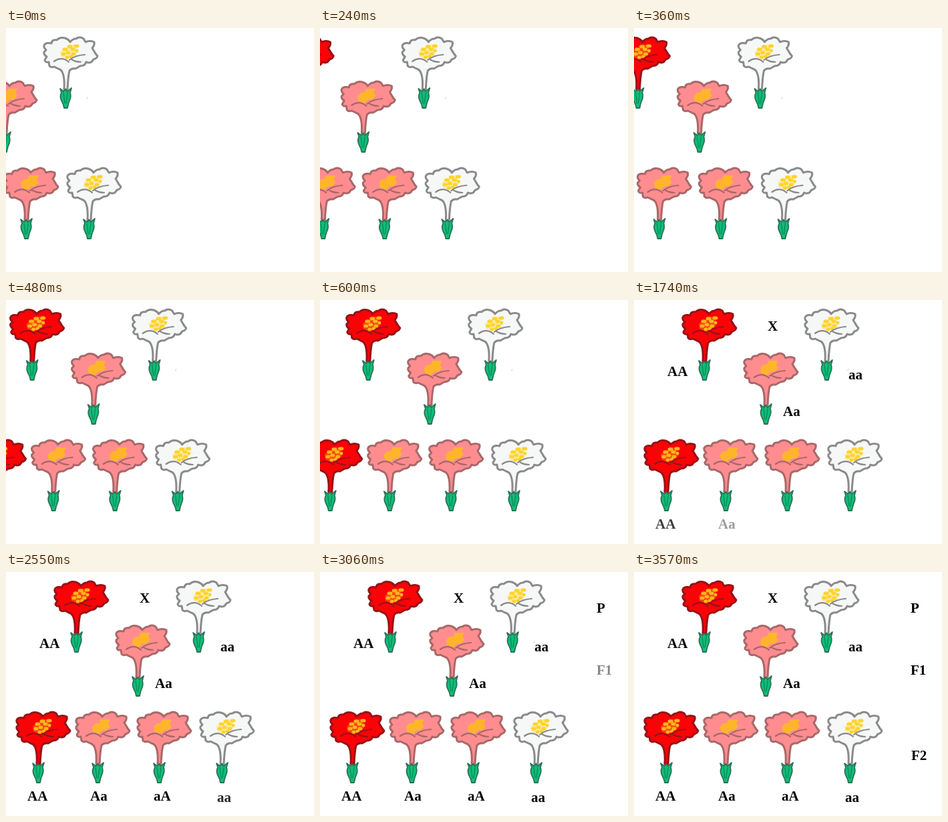
Write an HTML page with a canvas that moves like this. It is 461 px wide and 366 px high and loops after 4.6 s.

```html
<!DOCTYPE html>
<html lang="en">
<head>
<meta charset="utf-8">
<title>Flower crossing</title>
<style>
html, body { margin: 0; width: 100%; height: 100%; overflow: hidden; background: #fff; }
canvas { display: block; }
</style>
</head>
<body>
<canvas width="461" height="366"></canvas>
<script>
const ctx = document.querySelector('canvas').getContext('2d');
const LOOP = 4600, STEP = 30, SLIDE = 720, DISTANCE = 199, FADE = 510;

// Flower parts, in the coordinates of the upper white flower
const petals = new Path2D(`M295 21 Q299 16 304 16 Q309 12 315 16 L318 21 Q325 18 331 21
  Q332 26 328 30 L331 35 Q333 39 336 42 Q335 46 330 47 L327 51 Q323 53 319 51
  Q317 57 310 57 L303 61 Q297 60 294 64 Q292 72 291 92 L286 92 Q287 76 284 68
  Q282 62 277 61 L271 58 Q267 60 264 57 L263 51 Q257 52 257 48 L260 43 Q255 40 256 36
  L259 33 Q255 29 256 26 Q258 21 267 23 Q268 17 275 18 Q280 13 287 15 Q293 17 295 21 Z`);
const folds = new Path2D('M271 50 Q282 42 293 51 M294 48 Q302 41 317 40 M297 47 Q303 51 311 51');
const calyx = new Path2D(`M280 91 L285 95 L288 92 L291 95 L297 90 L295 97 Q297 103 294 109
  Q292 114 291 120 H286 Q285 114 282 109 Q279 103 282 97 Z`);
const veins = new Path2D('M285 97 L287 113 M291 97 L289 113');
const heart = new Path2D('M280 36 L285 31 L290 31 L293 25 L307 25 L304 31 L307 36 L302 41 L295 42 L290 47 L281 43 Z');
const specks = new Path2D(`M284 39 h2 M286 32 h3 M293 28 h3 M303 27 h3 M298 32 h2 M305 34 h0
  M291 37 h2 M299 39 h2 M290 44 h1 M296 43 h1`);
const mark = new Path2D('M320 106 l1 -2');

const white = { fill: '#f6f7f7', line: '#8a8a8a', centre: '#ffd42a', dots: true };
const red = { fill: '#fb0207', line: '#971317', centre: '#ffb51c', dots: true };
const pink = { fill: '#ff8d8f', line: '#a8686a', centre: '#ffb52b' };

const flowers = [
  [red, -183, 0], [white, 0, 0], [pink, -91, 66],
  [red, -240, 196], [pink, -151, 196], [pink, -59, 196], [white, 35, 196]
];

// text, x, baseline, start of the fade
const labels = [
  ['AA', 50, 114, 602], ['X', 200, 46, 790], ['aa', 321, 119, 980], ['Aa', 223, 174, 1170],
  ['AA', 32, 343, 1355], ['Aa', 126, 343, 1545], ['aA', 221, 343, 1810], ['aa', 316, 345, 2115],
  ['P', 414, 61, 2575], ['F1', 414, 154, 2820], ['F2', 415, 282, 3060]
];

function stroke(path, color, width) {
  ctx.strokeStyle = color;
  ctx.lineWidth = width;
  ctx.stroke(path);
}

function fill(path, color, alpha = 1) {
  ctx.globalAlpha = alpha;
  ctx.fillStyle = color;
  ctx.fill(path);
  ctx.globalAlpha = 1;
}

function drawFlower([kind, x, y], shift) {
  ctx.save();
  ctx.translate(x + shift, y);
  fill(petals, kind.fill);
  fill(heart, kind.centre, kind.dots ? 0.35 : 1);
  if (kind.dots) stroke(specks, kind.centre, 5);
  stroke(folds, kind.line, 2.2);
  stroke(petals, kind.line, 3);
  fill(calyx, '#0fbd78');
  stroke(calyx, '#2b7359', 1.8);
  stroke(veins, '#0a8557', 1.2);
  ctx.restore();
}

function draw(t) {
  ctx.fillStyle = '#fff';
  ctx.fillRect(0, 0, 461, 366);
  ctx.lineJoin = ctx.lineCap = 'round';
  const shift = -DISTANCE * Math.max(0, 1 - t / SLIDE);
  for (const flower of flowers) drawFlower(flower, shift);
  ctx.translate(shift, 0);
  stroke(mark, '#c4c4c4', 1);
  ctx.translate(-shift, 0);

  ctx.font = 'bold 21px "Liberation Serif", serif';
  ctx.fillStyle = '#000';
  for (const [text, x, y, start] of labels) {
    ctx.globalAlpha = Math.min(1, Math.max(0, (t - start) / FADE));
    ctx.fillText(text, x, y);
  }
  ctx.globalAlpha = 1;
}

const begin = performance.now();
function tick() {
  const t = (performance.now() - begin) % LOOP;
  draw(Math.floor(t / STEP) * STEP);
  requestAnimationFrame(tick);
}
tick();
</script>
</body>
</html>
```
